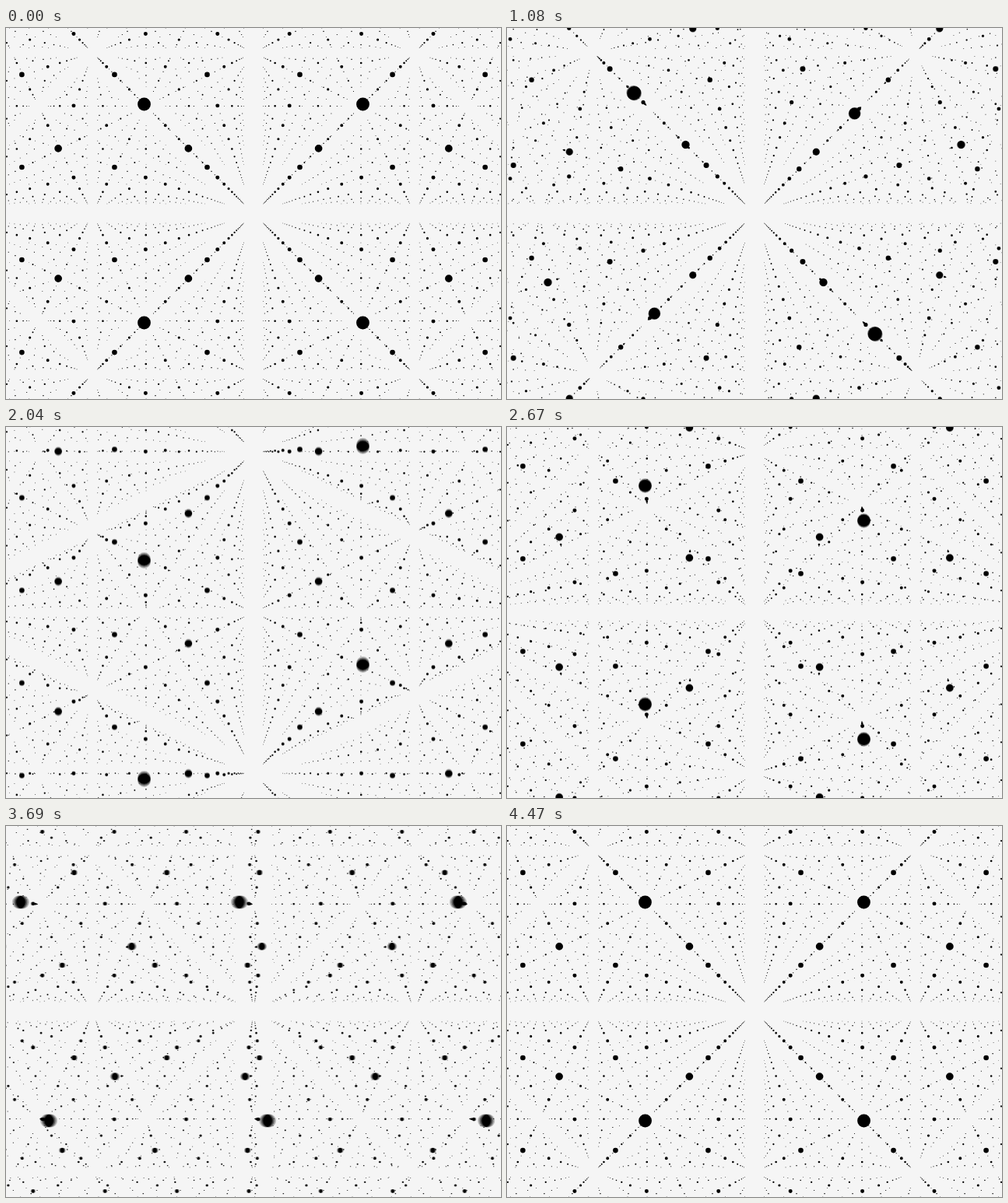
These frames come from a looping animation (636 px wide and 477 px high, 4.5 s). An HTML page with a canvas:

```html
<!DOCTYPE html>
<html>
<head>
<meta charset="utf-8">
<style>
html, body { margin: 0; width: 100%; height: 100%; overflow: hidden; background: #f5f5f5; }
canvas { display: block; }
</style>
</head>
<body>
<canvas id="stage" width="636" height="477"></canvas>
<script>
const W = 636, H = 477, CX = W / 2, CY = H / 2;
const FOCAL = CY / Math.tan(Math.PI / 6);
const NEAR = 1.47, FAR = 16.5, LAYERS = 16;
const LOOP = 4500, PHASE = 1500, STEP = 30;
const SAMPLES = 5, SHUTTER = 18, LAG = 13;
const ctx = document.getElementById('stage').getContext('2d');

const ease = p => p < 0.5 ? 0.5 * (2 * p) ** 2.13 : 1 - 0.5 * (2 - 2 * p) ** 2.13;
const sign = n => n & 1 ? 1 : -1;

function addDot(x, y, z) {
  if (z < 0.3 || z > FAR) return;
  const scale = FOCAL / z;
  const px = CX + x * scale, py = CY + y * scale;
  const r = 13 / z - 0.42;
  if (px < -r || px > W + r || py < -r || py > H + r) return;
  if (r < 0.8) {
    const side = r * 1.77;
    ctx.rect(px - side / 2, py - side / 2, side, side);
  } else {
    ctx.moveTo(px + r, py);
    ctx.arc(px, py, r, 0, 2 * Math.PI);
  }
}

// Neighbouring rows of the lattice slide one cell in opposite directions,
// first along z, then y, then x.
function addLattice(time) {
  const t = (time + LOOP) % LOOP;
  const phase = Math.floor(t / PHASE);
  const s = ease(t % PHASE / PHASE);
  for (let k = -1; k <= LAYERS; k++) {
    const z = k + NEAR;
    const reach = Math.max(z, 0.5) + (phase === 0 ? 1 : 0);
    const nx = Math.ceil(CX * reach / FOCAL) + 2;
    const ny = Math.ceil(CY * reach / FOCAL) + 2;
    for (let i = -nx; i < nx; i++) {
      for (let j = -ny; j < ny; j++) {
        const x = i + 0.5, y = j + 0.5;
        if (phase === 0) addDot(x, y, z - s * sign(i + j));
        else if (phase === 1) addDot(x, y + s * sign(i + k), z);
        else addDot(x + s * sign(j + k), y, z);
      }
    }
  }
}

// Equal alpha shares add up to full black, giving an even motion blur.
function draw(time) {
  ctx.globalCompositeOperation = 'source-over';
  ctx.clearRect(0, 0, W, H);
  ctx.globalCompositeOperation = 'lighter';
  ctx.globalAlpha = 1 / SAMPLES;
  ctx.fillStyle = '#000';
  for (let n = 0; n < SAMPLES; n++) {
    ctx.beginPath();
    addLattice(time + LAG + SHUTTER * ((n + 0.5) / SAMPLES - 0.5));
    ctx.fill();
  }
}

const start = performance.now();
let last = -1;

function tick() {
  const t = (performance.now() - start) % LOOP;
  const step = Math.floor(t / STEP);
  if (step !== last) {
    last = step;
    draw(step * STEP);
  }
  requestAnimationFrame(tick);
}
tick();
</script>
</body>
</html>
```
